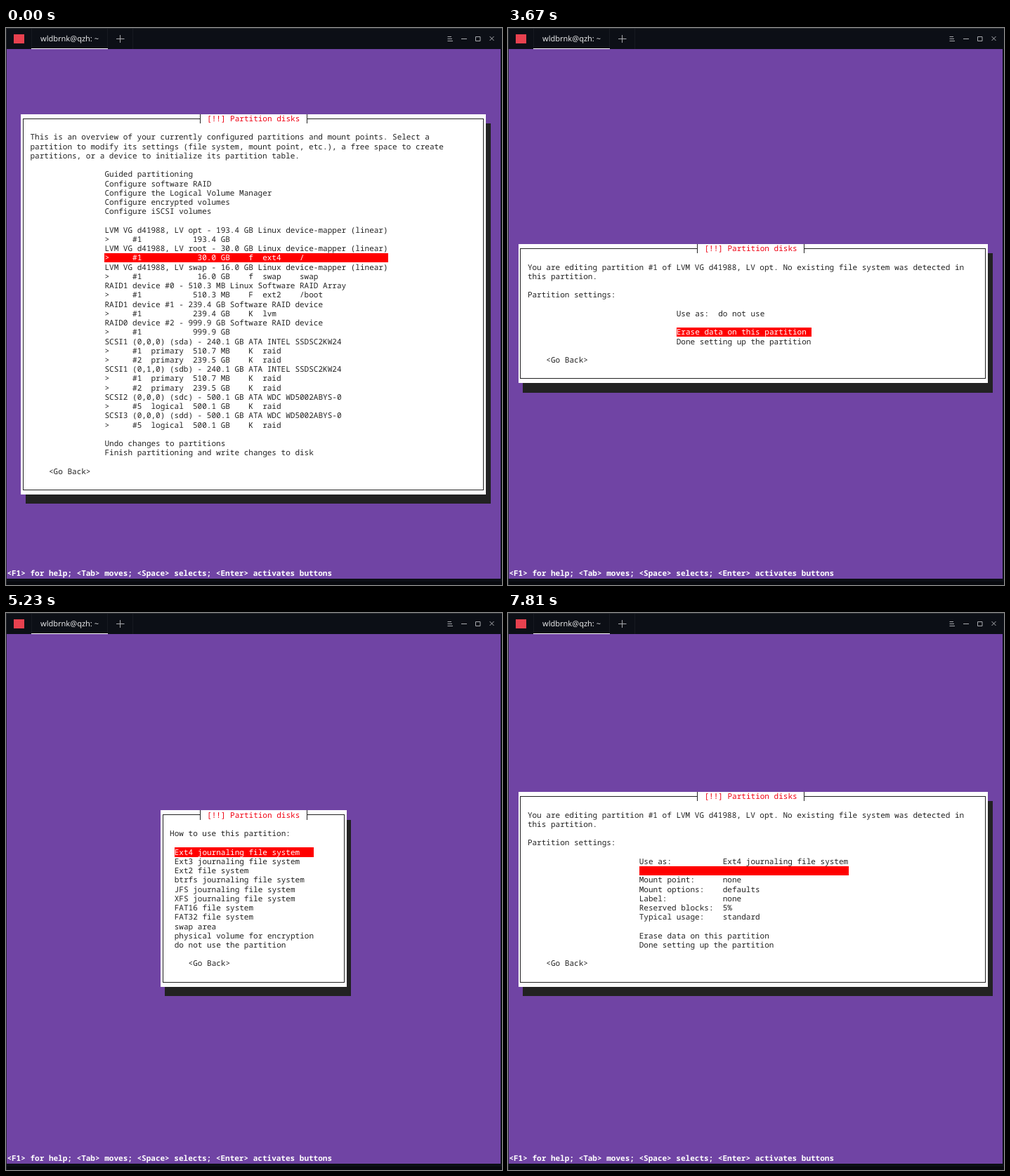
An HTML page for the animation above (8 s loop, 706 px wide and 794 px high).

```html
<!DOCTYPE html>
<html lang="en">
<head>
<meta charset="utf-8">
<title>Partition disks</title>
<style>
html, body { margin: 0; width: 100%; height: 100%; overflow: hidden; background: #0c0f16; }
svg { display: block; }
rect { shape-rendering: crispEdges; }
text { white-space: pre; text-rendering: geometricPrecision; }
#screen text { font: 11.033px "Noto Sans Mono", monospace; fill: #222; }
#screen .title { fill: #f00012; }
#screen .on { fill: #fff; }
#screen .help { fill: #fff; font-weight: 700; }
.frame { fill: none; stroke: #222; stroke-width: 1; shape-rendering: crispEdges; }
.icon { fill: none; stroke: #a9abaf; stroke-width: 1; }
</style>
</head>
<body>
<svg width="706" height="794" viewBox="0 0 706 794">
  <rect width="706" height="794" fill="#0c0f16"/>
  <rect width="706" height="1" fill="#2b2e33"/>
  <rect width="1" height="794" fill="#24272c"/>
  <rect x="1" y="789" width="705" height="5" fill="#07090e"/>
  <path d="M36.5 1V30M144.5 1V30M180.5 1V30" stroke="#171a21"/>
  <rect x="11" y="9" width="15" height="13" fill="#e8414f"/>
  <text x="90.5" y="19" text-anchor="middle" font-family="Noto Sans, Open Sans, sans-serif" font-size="11" fill="#e6e7e8">wldbrnk@qzh: ~</text>
  <rect x="36" y="29" width="109" height="2" fill="#fff"/>
  <path class="icon" d="M157 15.5H168.500M162.500 10V21"/>
  <path class="icon" d="M628.500 12.500H634M628.500 15.500H635M628.500 18.500H636M648 15.500H656M668.500 12.500H675V18.500H668.500ZM688.500 12L694.500 18M694.500 12L688.500 18"/>
  <g id="screen"></g>
</svg>
<script>
const CW = 6.62, CH = 13.23, COLS = 106, ROWS = 57;
const X = c => +(1.4 + c * CW).toFixed(2);
const Y = r => +(30 + r * CH).toFixed(2);
const screen = document.getElementById("screen");

const esc = s => s.replace(/&/g, "&amp;").replace(/</g, "&lt;").replace(/>/g, "&gt;");
const text = (c, r, s, cls = "") =>
  s && `<text x="${X(c)}" y="${+(Y(r) + 10.4).toFixed(2)}" class="${cls}">${esc(s)}</text>`;

function box(c0, r0, c1, r1, fill) {
  const x = Math.round(X(c0)), y = Math.round(Y(r0));
  return `<rect x="${x}" y="${y}" width="${Math.round(X(c1)) - x}" height="${Math.round(Y(r1)) - y}" fill="${fill}"/>`;
}

// Partition row: number, kind, size, flag, file system, mount point
const part = (num, kind, size, flag = "", fs = "", mount = "") =>
  ">     #" + num + "  " + kind.padEnd(7) + size.padStart(10) + "    " +
  flag.padEnd(3) + fs.padEnd(8) + mount;

const raid = (num, kind, size) => part(num, kind, size, "K", "raid");
const lv = (name, size) => `LVM VG d41988, LV ${name} - ${size} Linux device-mapper (linear)`;
const ssd = (id, dev) => [
  `SCSI1 (${id}) (${dev}) - 240.1 GB ATA INTEL SSDSC2KW24`,
  raid(1, "primary", "510.7 MB"),
  raid(2, "primary", "239.5 GB")
];
const hdd = (n, dev) => [
  `SCSI${n} (0,0,0) (${dev}) - 500.1 GB ATA WDC WD5002ABYS-0`,
  raid(5, "logical", "500.1 GB")
];
const option = (name, value) => name.padEnd(18) + value;

const editing = [
  "You are editing partition #1 of LVM VG d41988, LV opt. No existing file system was detected in",
  "this partition.", "", "Partition settings:"
];
const finish = ["", "Erase data on this partition", "Done setting up the partition"];

// rect: left, top, right, bottom cells; list: column, row, width
const overview = {
  rect: [3, 7, 103, 48], list: [21, 13, 61], back: [9, 45],
  intro: [
    "This is an overview of your currently configured partitions and mount points. Select a",
    "partition to modify its settings (file system, mount point, etc.), a free space to create",
    "partitions, or a device to initialize its partition table."
  ],
  items: [
    "Guided partitioning", "Configure software RAID", "Configure the Logical Volume Manager",
    "Configure encrypted volumes", "Configure iSCSI volumes", "",
    lv("opt", "193.4 GB"), part(1, "", "193.4 GB"),
    lv("root", "30.0 GB"), part(1, "", "30.0 GB", "f", "ext4", "/"),
    lv("swap", "16.0 GB"), part(1, "", "16.0 GB", "f", "swap", "swap"),
    "RAID1 device #0 - 510.3 MB Linux Software RAID Array",
    part(1, "", "510.3 MB", "F", "ext2", "/boot"),
    "RAID1 device #1 - 239.4 GB Software RAID device",
    part(1, "", "239.4 GB", "K", "lvm"),
    "RAID0 device #2 - 999.9 GB Software RAID device",
    part(1, "", "999.9 GB"),
    ...ssd("0,0,0", "sda"), ...ssd("0,1,0", "sdb"), ...hdd(2, "sdc"), ...hdd(3, "sdd"),
    "", "Undo changes to partitions", "Finish partitioning and write changes to disk"
  ]
};
const unused = {
  rect: [2, 21, 103, 36], list: [36, 28, 29], back: [8, 33], intro: editing,
  items: ["Use as:  do not use", ...finish]
};
const usage = {
  rect: [33, 19, 73, 38], list: [36, 23, 30], back: [39, 35],
  intro: ["How to use this partition:"],
  items: [
    "Ext4 journaling file system", "Ext3 journaling file system", "Ext2 file system",
    "btrfs journaling file system", "JFS journaling file system", "XFS journaling file system",
    "FAT16 file system", "FAT32 file system", "swap area",
    "physical volume for encryption", "do not use the partition"
  ]
};
const ext4 = {
  rect: [2, 17, 103, 38], list: [28, 24, 45], back: [8, 35], intro: editing,
  items: [
    option("Use as:", "Ext4 journaling file system"), "",
    option("Mount point:", "none"), option("Mount options:", "defaults"),
    option("Label:", "none"), option("Reserved blocks:", "5%"),
    option("Typical usage:", "standard"), ...finish
  ]
};

function border([l, t, r, b]) {
  const px = c => Math.floor(X(c + 0.5)) + 0.5, py = row => Math.floor(Y(row + 0.5)) + 0.5;
  const tee = Math.floor((l + r) / 2) - 12;
  const a = px(tee), z = px(tee + 23), top = py(t), y0 = Math.round(Y(t)), y1 = Math.round(Y(t + 1));
  return `<path class="frame" d="M${a} ${top}H${px(l)}V${py(b - 1)}H${px(r - 1)}V${top}H${z}M${a} ${y0}V${y1}M${z} ${y0}V${y1}"/>` +
    text(tee + 2, t, "[!!] Partition disks", "title");
}

function dialog(d, selected) {
  const [l, t, r, b] = d.rect, [col, row, width] = d.list;
  return box(0, 0, COLS + 0.1, ROWS + 0.05, "#7044a4") +
    box(l + 1, t + 1, r + 1, b + 1, "#222") +
    box(l, t, r, b, "#fff") +
    border(d.rect) +
    d.intro.map((s, i) => text(l + 2, t + 2 + i, s)).join("") +
    box(col, row + selected, col + width, row + selected + 1, "#f00") +
    d.items.map((s, i) => text(col, row + i, s, i === selected ? "on" : "")).join("") +
    text(...d.back, "<Go Back>") +
    text(0, ROWS - 1, "<F1> for help; <Tab> moves; <Space> selects; <Enter> activates buttons", "help");
}

const cleared = () =>
  box(0, 0, COLS + 0.1, ROWS - 1, "#7044a4") + box(0, ROWS - 1, 1, ROWS, "#fffff0");

// Start time, dialog, selected item
const steps = [
  [0, overview, 9], [860, overview, 8], [1500, overview, 7],
  [2600], [2710, unused, 3], [3670, unused, 2], [4180, unused, 1], [4600, unused, 0],
  [5150], [5230, usage, 0],
  [6250], [6550, ext4, 0], [7810, ext4, 1]
];
const LOOP = 8000;
let shown;

function render(ms) {
  const step = steps.findLast(s => s[0] <= ms);
  if (step === shown) return;
  shown = step;
  screen.innerHTML = step[1] ? dialog(step[1], step[2]) : cleared();
}

const start = performance.now();
function tick() {
  render((performance.now() - start) % LOOP);
  requestAnimationFrame(tick);
}
tick();
</script>
</body>
</html>
```
